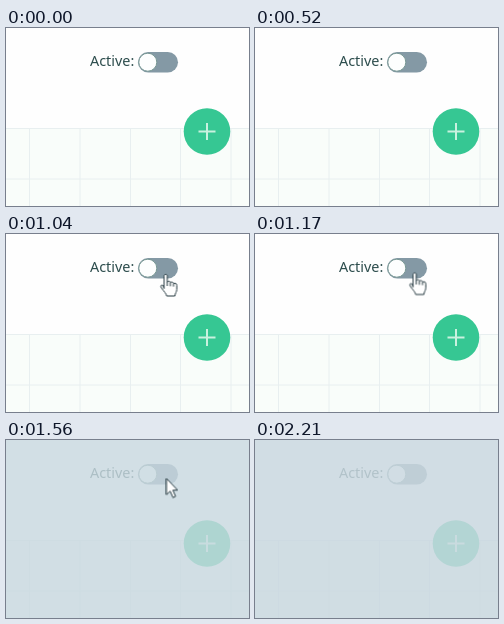
Animation, 243 px wide and 178 px high, one loop 3250 ms. Source, as an HTML page:

```html
<!DOCTYPE html>
<html lang="en">
<head>
<meta charset="utf-8">
<title>Toggle and overlay</title>
<style>
  html, body { margin: 0; width: 100%; height: 100%; overflow: hidden; background: #fff; }
  svg { display: block; width: 100vw; height: 100vh; }
  text { font: 14.4px "Noto Sans", "Open Sans", sans-serif; fill: #2d4d4d; }
  #arrow, #hand { fill: #fff; stroke: #24383f; stroke-width: 1; stroke-linejoin: round; visibility: hidden; }
</style>
</head>
<body>
<svg viewBox="0 0 243 178" preserveAspectRatio="none">
  <rect width="243" height="178" fill="#fefefe"/>
  <rect y="100" width="243" height="78" fill="#f9fdfa"/>
  <path id="grid" d="M0 100.5H243M0 151H243M23.5 100V178M74 100V178M124.5 100V178M174.5 100V178M225 100V178"
        fill="none" stroke="#e8eff0"/>

  <text x="84" y="38.3">Active:</text>
  <rect x="132" y="24" width="40" height="20.5" rx="10.25" fill="#8499a5"/>
  <circle cx="141.8" cy="34.2" r="9" fill="#fdfefe" stroke="#789894" stroke-width="1"/>

  <circle cx="201" cy="103.5" r="23.3" fill="#36c793"/>
  <path d="M192.5 103.5H209.5M201 95V112" fill="none" stroke="#c9f1df" stroke-width="2"/>

  <rect id="veil" width="243" height="178" fill="#c9d8e0" opacity="0"/>

  <path id="arrow" d="M0 0V16.2L3.7 12.7L6.5 19L9.1 17.9L6.4 11.7H11.2Z"/>
  <g id="hand">
    <path d="M3.6 14.5V2.2C3.6 -.2 6.8 -.2 6.8 2.2V8.2C7.5 6.7 9.8 7 9.9 8.7C10.8 7.5 12.8 8 13 9.6
             C14.2 8.7 16.3 9.3 16.3 11.3V15.5C16.3 18 14.6 19 14.4 22H6.2C5.8 19.5 3.5 17.6 1 14
             C-.7 11.6 1.3 10.3 2.6 11.6Z"/>
    <path d="M6.8 8V12M9.9 9V12.3M13 10V12.6" fill="none"/>
  </g>
</svg>
<script>
  const LOOP = 3250;

  // Each row is [time in ms, properties held until the next row].
  function play(id, rows) {
    const last = rows[rows.length - 1][1];
    const frames = rows.map(([time, props]) => ({ offset: time / LOOP, easing: 'step-end', ...props }));
    frames.push({ offset: 1, ...last });
    const animation = document.getElementById(id).animate(frames, { duration: LOOP, iterations: Infinity });
    animation.startTime = start;
  }

  const start = document.timeline.currentTime ?? 0;
  const at = (x, y) => ({ visibility: 'visible', transform: `translate(${x}px, ${y}px)` });
  const hidden = { visibility: 'hidden', transform: 'translate(0px, 0px)' };

  play('arrow', [
    [0, hidden],
    [780, at(162.5, 76.5)],
    [910, at(161, 58)],
    [1040, hidden],
    [1430, at(160.5, 38.5)],
    [1950, at(167, 64)],
    [2080, at(179, 131)],
    [2210, hidden]
  ]);
  play('hand', [
    [0, hidden],
    [1040, at(154.5, 40)],
    [1170, at(154.5, 38.5)],
    [1430, hidden]
  ]);
  play('veil', [
    [0, { opacity: 0 }],
    [1430, { opacity: 0.46 }],
    [1560, { opacity: 0.82 }],
    [1690, { opacity: 0.85 }]
  ]);
</script>
</body>
</html>
```
